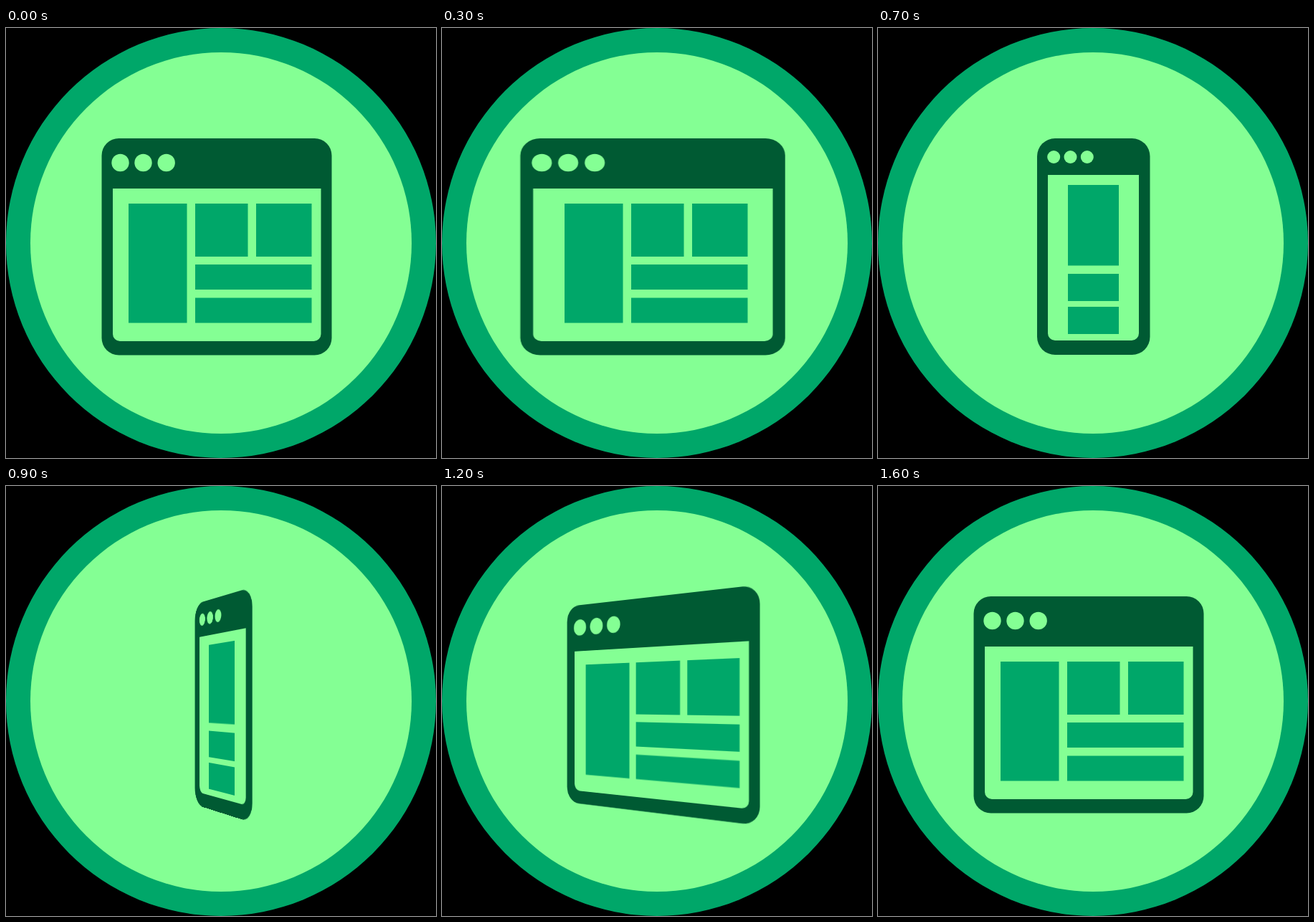
An HTML page for the animation above (1700 ms loop, 600x600 px).

```html
<!DOCTYPE html>
<html lang="en">
<head>
<meta charset="utf-8">
<title>Responsive window</title>
<style>
  html, body { margin: 0; width: 100%; height: 100%; overflow: hidden; background: #000; }
  .stage { position: relative; width: 600px; height: 600px; overflow: hidden; perspective: 840px; }
  svg { position: absolute; left: 0; top: 0; width: 600px; height: 600px; display: block; }
  .ring { fill: #00a769; }
  .light { fill: #84ff94; }
  .dark { fill: #005a33; }
  .block { fill: #00a769; }

  .spin, .desk, .phone, .frame, .content { animation: 1700ms step-end infinite; }
  .spin { position: absolute; inset: 0; transform-origin: 300px 300px; animation-name: spin; }
  .desk { animation-name: desk; }
  .phone { animation-name: phone; }
  .frame { transform-origin: 294px 305px; animation-name: stretch; }
  .content { transform-origin: 298.5px 328px; animation-name: squeeze; }

  /* The motion runs at ten poses per second: one step per 100 ms. */
  @keyframes spin {
    0% { transform: rotateY(0deg); }
    41.17% { transform: rotateY(0deg); animation-timing-function: steps(3); }
    58.82% { transform: rotateY(-89.5deg); animation-timing-function: steps(2); }
    70.58% { transform: rotateY(-33.3deg); animation-timing-function: steps(2); }
    82.35% { transform: rotateY(31.3deg); animation-timing-function: steps(2); }
    94.11%, 100% { transform: rotateY(0deg); }
  }
  @keyframes stretch {
    0% { transform: scaleX(1); animation-timing-function: steps(3); }
    17.64% { transform: scaleX(1.151); }
    23.52% { transform: scaleX(.82); }
    29.41%, 100% { transform: scaleX(1); }
  }
  @keyframes squeeze {
    0% { transform: scaleX(1); }
    23.52% { transform: scaleX(.82); }
    29.41%, 100% { transform: scaleX(1); }
  }
  @keyframes desk {
    0% { visibility: visible; }
    29.41% { visibility: hidden; }
    58.82%, 100% { visibility: visible; }
  }
  @keyframes phone {
    0% { visibility: hidden; }
    29.41% { visibility: visible; }
    58.82%, 100% { visibility: hidden; }
  }
</style>
</head>
<body>
<div class="stage">
  <svg viewBox="0 0 600 600">
    <circle class="ring" cx="300" cy="300" r="300"/>
    <circle class="light" cx="300" cy="300" r="266"/>
  </svg>
  <div class="spin">
    <svg class="desk" viewBox="0 0 600 600">
      <g class="frame">
        <rect class="dark" x="133.5" y="154" width="321" height="302.5" rx="24"/>
        <path class="light" d="M149 224H439.5V427a10 10 0 0 1-10 10H159a10 10 0 0 1-10-10z"/>
        <g class="light">
          <circle cx="159.5" cy="188" r="12.2"/>
          <circle cx="191.5" cy="188" r="12.2"/>
          <circle cx="223.7" cy="188" r="12.2"/>
        </g>
      </g>
      <g class="content block">
        <rect x="171" y="245" width="81.5" height="166.5"/>
        <rect x="264" y="245" width="73.5" height="74"/>
        <rect x="349" y="245" width="77.5" height="74"/>
        <rect x="264" y="330" width="162.5" height="35"/>
        <rect x="264" y="376.5" width="162.5" height="35"/>
      </g>
    </svg>
    <svg class="phone" viewBox="0 0 600 600">
      <rect class="dark" x="222" y="154" width="157.5" height="302" rx="25"/>
      <path class="light" d="M237 205H364V426a10 10 0 0 1-10 10H247a10 10 0 0 1-10-10z"/>
      <g class="light">
        <circle cx="245.2" cy="180" r="9"/>
        <circle cx="268.5" cy="180" r="9"/>
        <circle cx="291.8" cy="180" r="9"/>
      </g>
      <g class="block">
        <rect x="265" y="219" width="71" height="112.5"/>
        <rect x="265" y="343" width="71" height="38"/>
        <rect x="265" y="389" width="71" height="38"/>
      </g>
    </svg>
  </div>
</div>
</body>
</html>
```
